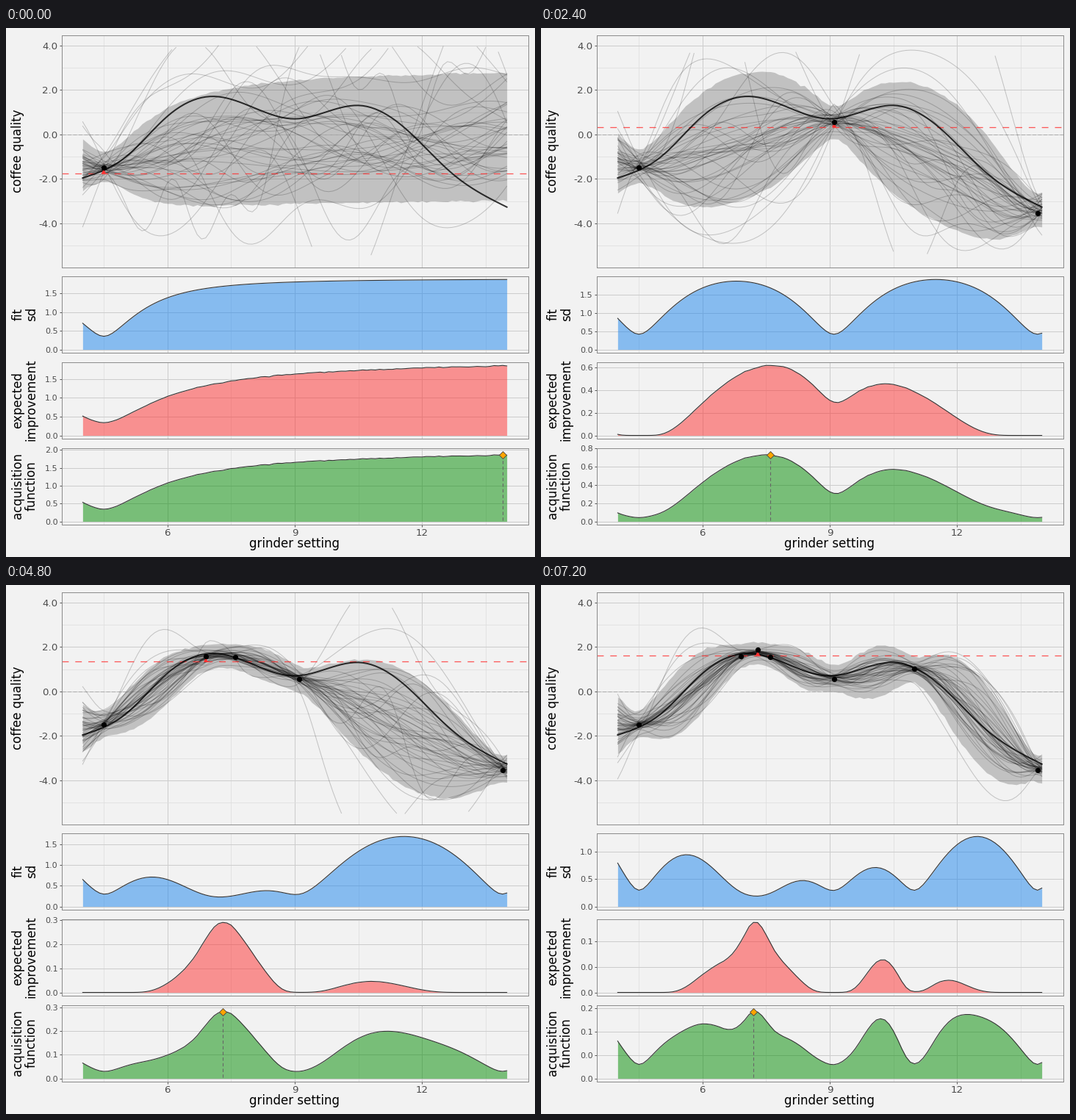
Animation, 720 px wide and 720 px high, one loop 8 s. Source, as a matplotlib script:

```python
import math

import numpy as np
import matplotlib.pyplot as plt
from matplotlib.animation import FuncAnimation

SIZE, DPI = 720, 100
PX = 72 / DPI
BG = "#f2f2f2"
RED = "#ff3030"
Y_MIN, Y_MAX = -5.5, 4.0
MARGIN = .245  # the bar to beat lies this far below the best cup
GRID = np.linspace(4, 14, 101)

# grinder settings in the order they are tried, and how each cup tasted
SETTINGS = np.array([4.5, 13.9, 9.1, 7.6, 6.9, 7.3, 11.0, 7.2])
QUALITY = np.array([-1.5, -3.53, .56, 1.55, 1.58, 1.87, 1.03])

# amplitude, squared length scale, noise and prior mean of each fit
FITS = [(1.9, 2.1, .36, .15), (2.97, 3, .36, 1.8), (2.7, 3, .42, 2.3), (3.2, 4.5, .45, 2.3),
        (3.15, 6, .3, 2.3), (3.12, 5, .3, 2.3), (3.2, 4, .3, 2.3)]

plt.rcParams["font.family"] = "DejaVu Sans"


def spline(points, x):
    """Natural cubic spline through a few points."""
    xk, yk = np.array(points, float).T
    h, n = np.diff(xk), len(xk)
    a, rhs = np.eye(n), np.zeros(n)
    for j in range(1, n - 1):
        a[j, j - 1:j + 2] = h[j - 1], 2 * (h[j - 1] + h[j]), h[j]
        rhs[j] = 6 * ((yk[j + 1] - yk[j]) / h[j] - (yk[j] - yk[j - 1]) / h[j - 1])
    m = np.linalg.solve(a, rhs)
    k = np.clip(np.searchsorted(xk, x) - 1, 0, n - 2)
    p, q, w = xk[k + 1] - x, x - xk[k], h[k]
    return ((m[k] * p**3 + m[k + 1] * q**3) / (6 * w)
            + (yk[k] / w - m[k] * w / 6) * p
            + (yk[k + 1] / w - m[k + 1] * w / 6) * q)


TRUTH = spline([(4, -1.96), (5, -1.04), (6, .82), (7.1, 1.71), (9, .7), (10.55, 1.3),
                (11.6, .28), (12.7, -1.74), (14, -3.27)], GRID)


def condition(kernel, xs, noise):
    """Weights of the observations at each grid point, and the variance left."""
    cross = kernel(GRID, xs)
    weights = cross @ np.linalg.inv(kernel(xs, xs) + noise**2 * np.eye(len(xs)))
    return weights, kernel(GRID[:1], GRID[:1])[0, 0] - (weights * cross).sum(1)


def posterior(xs, ys, amp, scale, noise, prior):
    def kernel(a, b):
        return amp**2 / np.sqrt(1 + (a[:, None] - b) ** 2 / scale)

    weights, var = condition(kernel, xs, noise)
    return prior + weights @ (ys - prior), np.sqrt(var)


def wiggle(xs, rng, noise=.12, waves=60):
    """A smooth random curve of unit spread that changes sign near each cup."""
    length = np.exp(rng.normal(.4, .35))
    freq = rng.normal(0, 1 / length, waves)
    phase = rng.uniform(0, 2 * np.pi, waves)

    def wave(x):
        return np.cos(np.outer(x, freq) + phase).sum(1) * np.sqrt(2 / waves)

    def kernel(a, b):
        return np.exp(-.5 * ((a[:, None] - b) / length) ** 2)

    weights, var = condition(kernel, xs, noise)
    rest = wave(GRID) - weights @ (wave(xs) + rng.normal(0, noise, len(xs)))
    return rest / np.sqrt(var + .02)


def improvement(mean, sd, bar):
    z = (mean - bar) / sd
    cdf = np.array([.5 * (1 + math.erf(v / math.sqrt(2))) for v in z])
    return (mean - bar) * cdf + sd * np.exp(-z**2 / 2) / math.sqrt(2 * math.pi)


def fit_round(n):
    rng = np.random.default_rng(40 + n)
    xs, ys = SETTINGS[:n + 1], QUALITY[:n + 1]
    mean, sd = posterior(xs, ys, *FITS[n])
    best = ys.argmax()
    gain = improvement(mean, sd, ys[best] - MARGIN)
    gain *= 1 + rng.normal(0, .004, GRID.size)
    half = np.hypot(1.52 * sd, .4)
    lines = []
    for _ in range(45):
        size = min(.75 * np.sqrt(3 / rng.chisquare(3)), 2)  # a few strays
        y = mean + size * sd * wiggle(xs, rng)
        lines.append(np.where((y > Y_MIN) & (y < Y_MAX), y, np.nan))
    return dict(xs=xs, ys=ys, best=best, pick=SETTINGS[n + 1], lines=lines, sd=sd, gain=gain,
                score=.9 * gain + .1 * sd,
                high=mean + half + rng.normal(0, .025, GRID.size),
                low=mean - half + rng.normal(0, .025, GRID.size))


rounds = [fit_round(n) for n in range(len(FITS))]

fig = plt.figure(figsize=(SIZE / DPI, SIZE / DPI), dpi=DPI, facecolor=BG)


def panel(top, bottom):
    return fig.add_axes([75.5 / SIZE, 1 - bottom / SIZE, 635 / SIZE, (bottom - top) / SIZE])


def title(x, y, text, rotation=90):
    fig.text(x / SIZE, 1 - y / SIZE, text, fontsize=12, rotation=rotation,
             rotation_mode="anchor", ha="center", va="baseline")


main = panel(9.5, 325.5)
small = [panel(337.5, 442.3), panel(454.5, 559.3), panel(571.5, 676.3)]
FILLS = ["#1c86ee", RED, "#008b00"]

title(21.5, 167, "coffee quality")
for y, words in [(389.5, ("fit", "sd")), (506.5, ("expected", "improvement")),
                 (623.5, ("acquisition", "function"))]:
    title(21.5, y, words[0])
    title(39.8, y, words[1])
title(393, 707, "grinder setting", 0)


def dashes(on, off, width):
    """Dash pattern in pixels for a line of the given pixel width."""
    return 0, (on / width, off / width)


def style(ax, ticks, size):
    ax.set_facecolor(BG)
    ax.set_xlim(3.5, 14.5)
    ax.set_xticks([6, 9, 12], ["6", "9", "12"])
    ax.set_xticks([4.5, 7.5, 10.5, 13.5], minor=True)
    ax.set_yticks(ticks, [f"{np.round(t * 10) / 10:.1f}" for t in ticks])
    ax.set_axisbelow(True)
    ax.grid(which="major", color="#cccccc", lw=PX)
    ax.grid(which="minor", color="#dfdfdf", lw=.8 * PX)
    ax.tick_params(length=3 * PX, width=PX, color="#555555", labelcolor="#4d4d4d", pad=2 * PX)
    ax.tick_params(axis="y", labelsize=size)
    ax.tick_params(axis="x", labelsize=9.6)
    ax.tick_params(which="minor", length=0)
    if ax is not small[2]:
        ax.tick_params(axis="x", length=0, labelbottom=False)
    for s in ax.spines.values():
        s.set(color="#8c8c8c", lw=PX)


def draw_main(r):
    ax = main
    ax.clear()
    style(ax, np.arange(-4, 5, 2), 9.6)
    ax.set_yticks(np.arange(-5, 4, 2), minor=True)
    ax.set_ylim(-5.975, 4.475)
    ax.axhline(0, color="#aaaaaa", lw=PX, ls=(0, (5, 2.5)))
    ax.fill_between(GRID, r["low"], r["high"], color="black", alpha=.2, lw=0)
    for y in r["lines"]:
        ax.plot(GRID, y, color="black", alpha=.2, lw=PX)
    x, y = r["xs"][r["best"]], r["ys"][r["best"]]
    ax.axhline(y - MARGIN, color=RED, alpha=.8, lw=1.3 * PX, ls=dashes(8.9, 8.9, 1.3 * PX / PX))
    ax.plot(GRID, TRUTH, color="black", alpha=.8, lw=2 * PX)
    ax.plot(x, y - .15, "^", color=RED, ms=4, mew=0, zorder=4)
    ax.plot(r["xs"], r["ys"], "o", color="black", ms=5.2, mew=0, zorder=5)


def draw_area(ax, y, fill, head):
    ax.clear()
    limit = y.max() * head
    top = limit * 1.05
    step = next(s for s in (1, .5, .2, .1, .05) if top / s >= 2.5)
    style(ax, np.arange(0, top, step), 8)
    ax.set_ylim(-.05 * limit, top)
    ax.fill_between(GRID, 0, y, color=fill, alpha=.5, lw=0)
    ax.plot(GRID, y, color="#333333", lw=1.1 * PX)


def draw(i):
    r = rounds[min(i // 3, len(rounds) - 1)]
    draw_main(r)
    for ax, key, fill, head in zip(small, ("sd", "gain", "score"), FILLS, (1, 1, 1.05)):
        draw_area(ax, r[key], fill, head)
    x = r["pick"]
    y = np.interp(x, GRID, r["score"])
    small[2].plot([x, x], [y, 0], color="#666666", lw=1.1 * PX, ls=(0, (4, 3)))
    small[2].plot(x, y, "D", mfc="#ffa500", mec="#444444", mew=.6, ms=5.2)
    return []


anim = FuncAnimation(fig, draw, frames=20, interval=400, repeat=True, repeat_delay=0,
                     init_func=lambda: draw(0))
plt.show()
```
